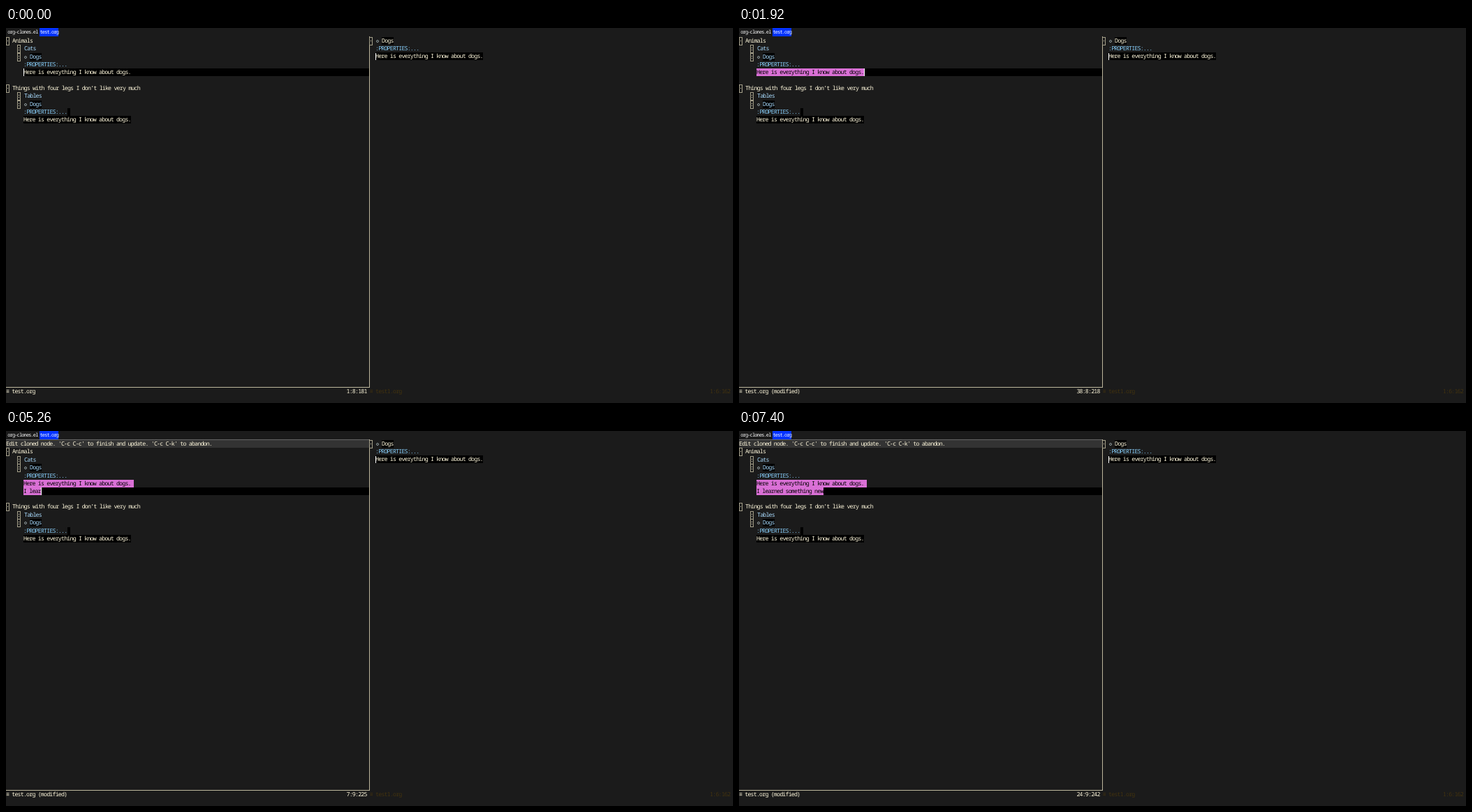
These frames come from a looping animation (1041 px wide and 538 px high, 7990 ms). An HTML page:

```html
<!DOCTYPE html>
<html lang="en">
<head>
<meta charset="utf-8">
<title>Editing a cloned org node</title>
<style>
  html, body { margin: 0; width: 100%; height: 100%; overflow: hidden; background: #1b1b1b; }
  #stage {
    position: relative; width: 1041px; height: 538px; overflow: hidden;
    background: #1b1b1b; color: #fff8dc;
    font: 8.326px/11px "Noto Sans Mono", "DejaVu Sans Mono", monospace;
    letter-spacing: -.1em; text-rendering: geometricPrecision;
    font-variant-ligatures: none;
  }
  #stage i { position: absolute; box-sizing: border-box; font-style: normal; white-space: pre; height: 11px; }
  #stage .tab { font-size: 7px; letter-spacing: -.125em; color: #fff; }
  #stage .on { background: #0433ff; height: 12px; }
  #stage .sky { color: #87cefa; }
  #stage .pale { color: #aadcff; }
  #stage .clone { background: #000; }
  #stage .edit { background: #da70d6; color: #000; }
  #stage .dim { color: #43330f; }
  #stage .head { background: #333; border-top: 1px solid #666; height: 12px; }
  #stage .line { background: #bdb79d; }
  #stage .box { border: 1px solid #a5a08a; }
  #stage .ring { border: 1px solid #8f9a9c; border-radius: 50%; }
  #stage .dot { background: #d8d2b8; }
  #stage .cursor { background: #fff; }
</style>
</head>
<body>
<div id="stage"><div id="fixed"></div><div id="live"></div></div>
<script>
const LOOP = 7990, CH = 4.163, HEAD = 11.5, ROW = 11.1;
const NOTE = "Here is everything I know about dogs.";
const TYPED = "I learned something new";

// [time, characters typed]
const KEYS = [[4500, 1], [4620, 3], [4990, 4], [5150, 5], [5260, 6], [5440, 7], [5550, 9],
  [5890, 10], [5980, 11], [6080, 12], [6280, 13], [6330, 14], [6520, 15], [6610, 16], [6700, 17],
  [6850, 18], [6950, 19], [7040, 20], [7190, 21], [7300, 22], [7400, 23]];

const text = (x, y, s, cls = "") => `<i class="${cls}" style="left:${x}px;top:${y}px">${s}</i>`;
const rect = (x, y, w, h, cls) =>
  `<i class="${cls}" style="left:${x}px;top:${y}px;width:${w}px;height:${h}px"></i>`;
const cursor = (x, y) => rect(Math.round(x), Math.round(y), 1, 11, "cursor");
const rightText = (x, y, s, cls) => text(x - s.length * CH, y, s, cls);

function bullet(x, y, dots) {
  const top = Math.round(y);
  const marks = dots === 1 ? [5] : [4, 7];
  return rect(x, top, 5, 12, "box") + marks.map(d => rect(x + 2, top + d, 1, 1, "dot")).join("");
}

function dogs(x, y, cls) {
  return rect(x, Math.round(y) + 4, 4, 4, "ring") + text(x + 8, y, "Dogs", cls + " clone");
}

function outline(state) {
  let y = state.header ? 24.2 : 12.7, html = "";
  const at = 25;
  const row = s => { html += s; y += ROW; };
  const heading = s => { html += s; y += HEAD; };
  const active = () => rect(at, Math.round(y), 495, 11, "clone");

  function section(title, child) {
    heading(bullet(0, y, 1) + text(9, y, title));
    heading(bullet(16, y, 2) + text(26, y, child, "pale"));
    heading(bullet(16, y, 2) + dogs(26, y, "pale"));
  }

  section("Animals", "Cats");
  row(text(at, y, ":PROPERTIES:...", "sky"));
  const noteEnd = at + NOTE.length * CH;
  const tail = state.extra ? " " : "";
  row((state.line === 8 ? active() : "") +
    text(at, y, NOTE + tail, state.edit ? "edit" : "clone") +
    (state.line === 8 ? cursor(state.col ? noteEnd : at, y) : ""));
  if (state.extra) {
    row(active() + text(at, y, TYPED.slice(0, state.typed), "edit") +
      (state.typed < TYPED.length ? cursor(at + state.typed * CH, y) : ""));
  }
  row(state.line === 9 && !state.extra ? active() + cursor(at, y) : "");

  section("Things with four legs I don’t like very much", "Tables");
  row(text(at, y, ":PROPERTIES:...", "sky") + rect(87.5, y, 4, 11, "clone"));
  row(text(at, y, NOTE, "clone"));
  return html;
}

function stateAt(t) {
  const typed = KEYS.reduce((n, [time, count]) => t >= time ? count : n, 0);
  const extra = t >= 4020;
  const line = extra || (t >= 1730 && t < 1920) ? 9 : 8;
  const col = line === 9 ? typed : t >= 1000 ? NOTE.length : 0;
  return {
    typed, extra, line, col,
    header: t >= 2920,
    edit: t >= 1920,
    modified: t >= 1730,
    echo: t >= 1730 && t < 1920
  };
}

function view(s) {
  const point = (s.line === 9 ? 219 : 181) + s.col;
  return (s.header
      ? text(0, 12, "Edit cloned node. 'C-c C-c' to finish and update. 'C-c C-k' to abandon.", "head")
        .replace('px"', 'px;width:520px"'.replace("px;", "px;")) : "") +
    outline(s) +
    text(0, 516, "≡ test.org" + (s.modified ? " (modified)" : "")) +
    rightText(516.7, 516, `${s.col + 1}:${s.line}:${point}`) +
    (s.echo ? text(0, 527, "Entered cloned node. Type ‘C-c C-c’ to edit.") : "");
}

document.getElementById("fixed").innerHTML =
  text(2.3, 1, "org-clones.el", "tab") +
  rect(48, 0, 27, 12, "on") + text(48.5, 1, "test.org", "tab") +
  rect(520, 12, 1, 504, "line") + rect(0, 515, 520, 1, "line") +
  bullet(520, 12.7, 1) + dogs(530, 12.7, "") +
  text(529, 24, ":PROPERTIES:...", "sky") +
  text(529, 35, NOTE, "clone") + rect(529, 36, 1, 10, "cursor") +
  text(520.8, 516, "≡ test1.org", "dim") +
  rightText(1037, 516, "1:6:162", "dim");

const live = document.getElementById("live");
let shown = "";
function tick(now) {
  const html = view(stateAt(now % LOOP));
  if (html !== shown) live.innerHTML = shown = html;
  requestAnimationFrame(tick);
}
tick(performance.now());
</script>
</body>
</html>
```
